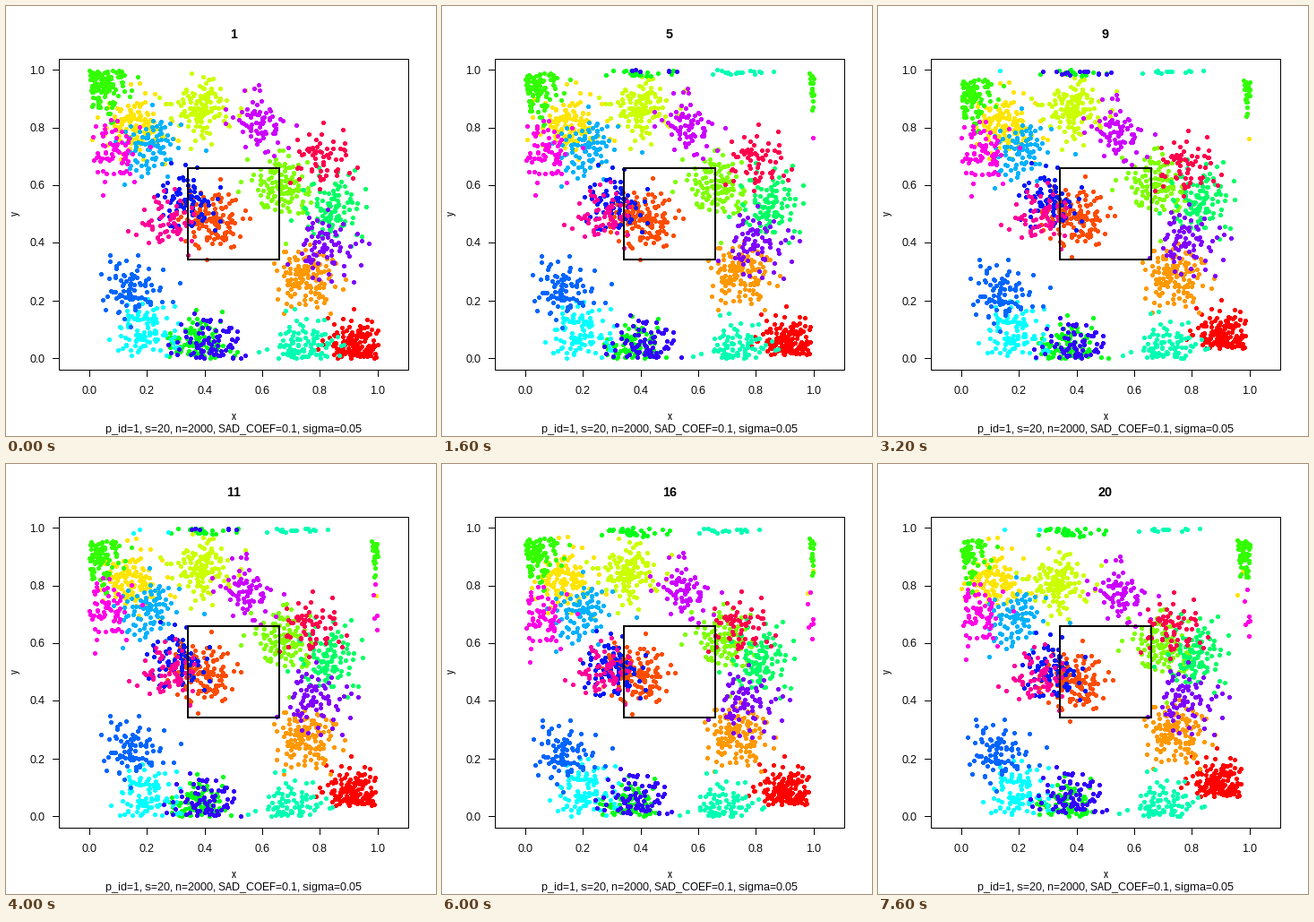
Write a matplotlib script that moves like this. It is 480 px wide and 480 px high and loops after 8 s.

```python
import colorsys

import matplotlib.pyplot as plt
import numpy as np
from matplotlib.animation import FuncAnimation
from matplotlib.patches import Rectangle

SIZE = 480
FRAMES = 20
INTERVAL = 400
SIGMA = 0.05
MEAN_STEP = (-0.0015, -0.0008)
STEP_SIGMA = 0.006

# Plot region in pixels; one data unit has the same length on both axes.
LEFT, RIGHT, TOP, BOTTOM = 59.5, 449.5, 59.5, 406.5
UNIT, ORIGIN_X, ORIGIN_Y = 321.8, 93.5, 393.7

# Where each species starts, most abundant first.
CENTERS = np.array([
    (0.93, 0.03), (0.42, 0.49), (0.75, 0.28), (0.16, 0.81), (0.38, 0.87),
    (0.66, 0.59), (0.03, 0.96), (0.38, 0.03), (0.84, 0.52), (0.75, 0.03),
    (0.20, 0.10), (0.21, 0.74), (0.15, 0.25), (0.34, 0.55), (0.43, 0.03),
    (0.81, 0.38), (0.59, 0.82), (0.09, 0.72), (0.27, 0.47), (0.80, 0.69),
])
SPECIES = len(CENTERS)


def scatter_around(center, count, rng):
    """Normal points around a centre, kept inside the unit square."""
    points = rng.normal(center, SIGMA, (count * 8, 2))
    inside = ((points >= 0) & (points <= 1)).all(axis=1)
    return points[inside][:count]


rng = np.random.default_rng(20)
counts = [round(150 * 0.955 ** i) for i in range(SPECIES)]
start = np.vstack([scatter_around(c, n, rng) for c, n in zip(CENTERS, counts)])
owner = np.repeat(np.arange(SPECIES), counts)
palette = np.array([colorsys.hsv_to_rgb(i / SPECIES, 1, 1) for i in range(SPECIES)])

# Each species takes a random walk as a rigid group on a torus.
steps = rng.normal(MEAN_STEP, STEP_SIGMA, (FRAMES, SPECIES, 2))
steps[0] = 0
walk = steps.cumsum(axis=0)


def to_pixels(points):
    pixels = points * (UNIT, -UNIT) + (ORIGIN_X, ORIGIN_Y)
    return np.floor(pixels) + 0.5


def positions(step):
    return to_pixels((start + walk[step][owner]) % 1)


plt.rcParams.update({
    "font.family": "Liberation Sans",
    "font.size": 12,
    "text.hinting": "native",
    "text.hinting_factor": 1,
})
fig = plt.figure(figsize=(SIZE / 72, SIZE / 72), dpi=72, facecolor="white")
ax = fig.add_axes([0, 0, 1, 1])
ax.set(xlim=(0, SIZE), ylim=(SIZE, 0))
ax.axis("off")


def line(x0, y0, x1, y1):
    ax.plot([x0, x1], [y0, y1], color="black", lw=1, snap=False,
            solid_capstyle="projecting")


def frame_box(x0, y0, x1, y1, width):
    ax.add_patch(Rectangle((x0, y0), x1 - x0, y1 - y0, fill=False, ec="black",
                           lw=width, joinstyle="miter", snap=False, zorder=4))


def label(x, y, text, **style):
    style = {"ha": "center", "va": "baseline", **style}
    return ax.text(x, y, text, **style)


frame_box(LEFT, TOP, RIGHT, BOTTOM, 1)
for value in np.linspace(0, 1, 6):
    x, y = to_pixels(np.array([value, value]))
    line(x, BOTTOM, x, BOTTOM + 7)
    line(LEFT - 7, y, LEFT, y)
    label(x - 0.5, 433, f"{value:.1f}")
    label(44, y + 4, f"{value:.1f}", ha="right")

label(254, 462, "x")
label(10, 232, "y", va="center", rotation=90)
label(254, 475, "p_id=1, s=20, n=2000, SAD_COEF=0.1, sigma=0.05")
title = label(254, 36, "1", fontsize=14, weight="bold")

# A five-pixel disc: a square without its corner pixels.
quarter = np.array([(2.5, 1.5), (1.5, 1.5), (1.5, 2.5)])
turn = np.array([(0, 1), (-1, 0)])
disc = np.vstack([quarter @ np.linalg.matrix_power(turn, k) for k in range(4)])

dots = ax.scatter(*positions(0).T, s=25, c=palette[owner], marker=disc,
                  linewidths=0, snap=False, zorder=3)
frame_box(203, 181, 305, 283, 2)


def update(step):
    dots.set_offsets(positions(step))
    title.set_text(str(step + 1))
    return dots, title


animation = FuncAnimation(fig, update, frames=FRAMES, interval=INTERVAL,
                          repeat=True, repeat_delay=0)
plt.show()
```
